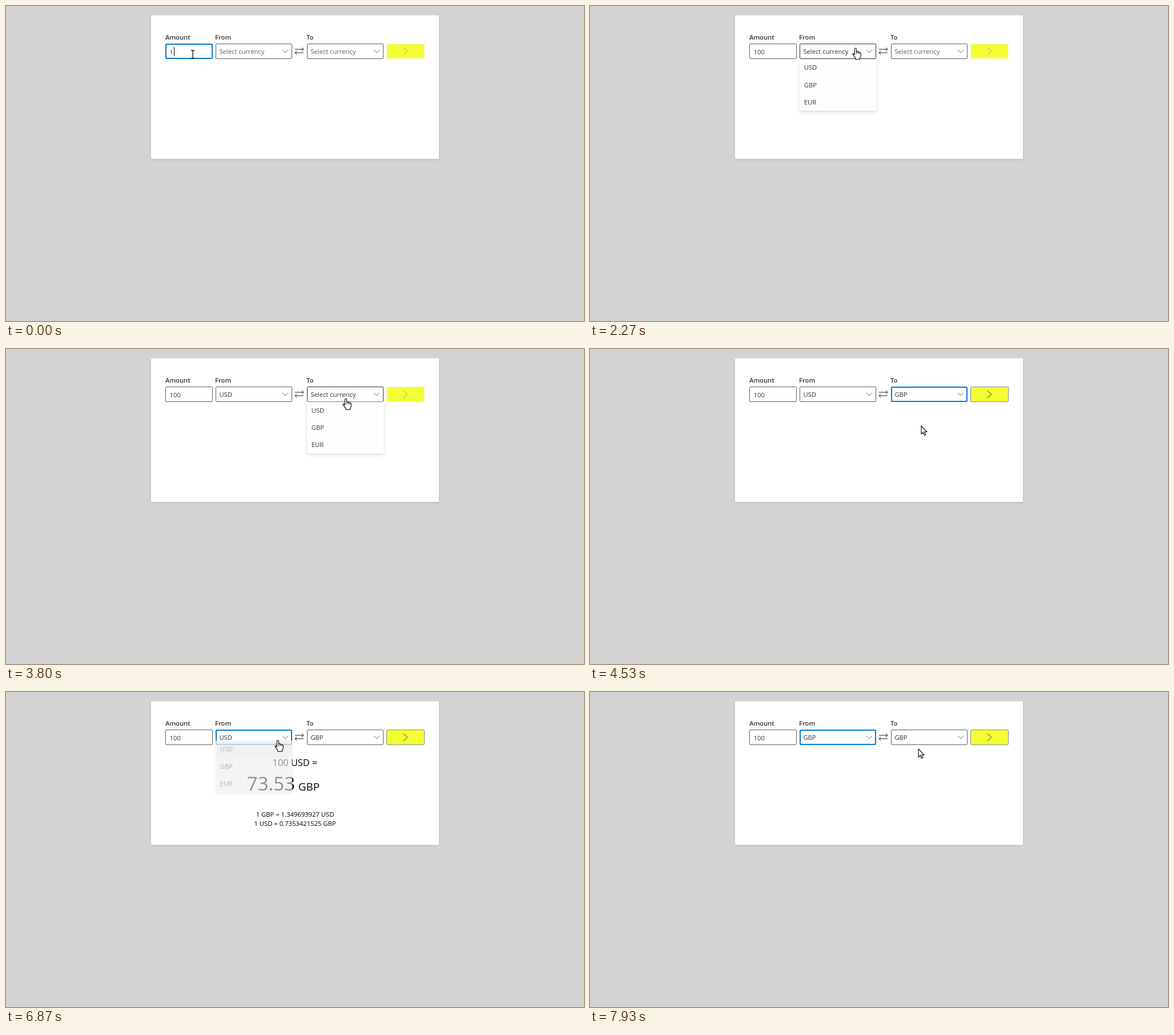
Write an HTML page with a canvas that moves like this. It is 1012 px wide and 553 px high and loops after 8000 ms.

```html
<!DOCTYPE html>
<html lang="en">
<head>
<meta charset="utf-8">
<title>Currency converter</title>
<style>
html, body { margin: 0; width: 100%; height: 100%; overflow: hidden; background: #d3d3d3; }
canvas { display: block; }
</style>
</head>
<body>
<canvas id="stage" width="1012" height="553"></canvas>
<script>
const ctx = document.getElementById('stage').getContext('2d');
const LOOP = 8000, TICK = 1000 / 15;
const DARK = '#323130', GREY = '#605e5c', BLUE = '#0078d4', YELLOW = '#f3ff34';
const CURRENCIES = ['USD', 'GBP', 'EUR'];
const ROW = 30.24, MENU_TOP = 93.4;
const FROM = { id: 'from', x: 367, w: 134 };
const TO = { id: 'to', x: 527, w: 134 };

// Pointer stops: [tick, x, y]
const STOPS = [
  [0, 327, 85], [19, 327, 85], [23, 376, 85], [29, 465, 74], [34, 465, 74],
  [39, 462, 104], [45, 462, 104], [53, 595, 87], [57, 595, 87], [64, 580, 135],
  [68, 580, 135], [73, 709, 90], [75, 709, 90], [80, 688, 87], [92, 688, 87],
  [93, 687, 85], [101, 476, 85], [103, 476, 85], [111, 462, 136], [116, 462, 136],
  [119, 575, 100], [120, 575, 100]
];
// Spans: [first tick, end tick, control]
const FOCUS = [[0, 29, 'amount'], [29, 32, 'from'], [45, 53, 'from'], [53, 56, 'to'],
  [67, 80, 'to'], [101, 104, 'from'], [116, 121, 'from']];
const OPEN = [[31, 45, 'from'], [55, 67, 'to'], [103, 116, 'from']];

const HAND = new Path2D('M-1.6 11.5V1.6Q-1.6 0 0 0Q1.5 0 1.5 1.6V6.5Q2 5.6 3 5.7Q4.2 5.9 4.2 7' +
  'Q4.8 6.3 5.8 6.5Q6.9 6.8 6.9 8Q9.3 7.2 9.3 9.5V13Q9.3 15 7.5 17V19.5H0V17.5' +
  'Q-2.5 14.5 -4.8 11.2Q-5.2 9.5 -4 9.3Q-3 9.2 -1.6 11.5Z');
const KNUCKLES = new Path2D('M1.5 6.5V10M4.2 7V10M6.9 8V10.5');
const ARROW = new Path2D('M0 0V14.2L3.3 11.2L5.5 16.4L7.8 15.4L5.6 10.3H10Z');
const IBEAM = new Path2D('M-3 -7H-1Q0 -7 0 -6Q0 -7 1 -7H3M0 -6.5V6.5M-3 7H-1Q0 7 0 6Q0 7 1 7H3');

const spanAt = (spans, tick) => spans.find(([a, b]) => tick >= a && tick < b);
const inside = (p, x, y, w, h) => p.x >= x && p.x < x + w && p.y >= y && p.y < y + h;

function pointerAt(tick) {
  const i = STOPS.findIndex((s, k) => k > 0 && tick <= s[0]);
  const [t0, x0, y0] = STOPS[i - 1], [t1, x1, y1] = STOPS[i];
  const u = (tick - t0) / (t1 - t0), e = u * u * (3 - 2 * u);
  return { x: Math.round(x0 + (x1 - x0) * e), y: Math.round(y0 + (y1 - y0) * e) };
}

// cubic-bezier(.1, .9, .2, 1)
function decelerate(x) {
  if (x >= 1) return 1;
  const curve = (s, a, b) => 3 * (1 - s) ** 2 * s * a + 3 * (1 - s) * s * s * b + s ** 3;
  let lo = 0, hi = 1;
  for (let i = 0; i < 24; i++) {
    const mid = (lo + hi) / 2;
    if (curve(mid, 0.1, 0.2) < x) lo = mid; else hi = mid;
  }
  return curve(lo, 0.9, 1);
}

function text(str, x, y, size = 11.2, color = DARK, weight = 400, align = 'left') {
  ctx.font = `${weight} ${size}px "Open Sans", "Noto Sans", sans-serif`;
  ctx.textAlign = align;
  ctx.fillStyle = color;
  ctx.fillText(str, x, y);
}

function line(points, color, width = 1) {
  ctx.beginPath();
  points.forEach(([x, y]) => ctx.lineTo(x, y));
  ctx.strokeStyle = color;
  ctx.lineWidth = width;
  ctx.stroke();
}

function box(x, y, w, h, fill, border, width = 1) {
  ctx.beginPath();
  ctx.roundRect(x + width / 2, y + width / 2, w - width, h - width, 1.2);
  ctx.fillStyle = fill;
  ctx.fill();
  ctx.strokeStyle = border;
  ctx.lineWidth = width;
  ctx.stroke();
}

function panel(x, y, w, h, depth) {
  for (const [dy, blur, alpha] of [[1.35, 3, 0.132], [0.25, 0.75, 0.108]]) {
    ctx.save();
    ctx.shadowColor = `rgba(0,0,0,${alpha})`;
    ctx.shadowOffsetY = dy * depth;
    ctx.shadowBlur = blur * depth;
    ctx.fillStyle = '#fff';
    ctx.beginPath();
    ctx.roundRect(x, y, w, h, 1.7);
    ctx.fill();
    ctx.restore();
  }
}

function field(x, w, focused, hovered) {
  box(x, 66, w, 27, '#fff', focused ? BLUE : hovered ? DARK : GREY, focused ? 2 : 1);
}

function select(s, value, state) {
  const active = state.hover === s.id || state.open === s.id;
  field(s.x, s.w, state.focus === s.id, active);
  text(value || 'Select currency', s.x + 6.4, 84, 11.2, value || active ? DARK : GREY);
  const c = s.x + 122;
  line([[c - 5, 77], [c, 82], [c + 5, 77]], GREY, 0.9);
}

function menu(s, value, progress, pointer) {
  ctx.save();
  ctx.globalAlpha = progress;
  ctx.translate(0, -12.5 * (1 - progress));
  panel(s.x, MENU_TOP, s.w + 0.4, 3 * ROW, 2);
  CURRENCIES.forEach((name, i) => {
    const y = MENU_TOP + i * ROW;
    const hovered = inside(pointer, s.x, y, s.w, ROW);
    if (hovered || name === value) {
      ctx.fillStyle = name === value ? '#edebe9' : '#f3f2f1';
      ctx.fillRect(s.x, y, s.w + 0.4, ROW);
    }
    text(name, s.x + 7.8, y + 19.2);
  });
  ctx.restore();
}

function swapIcon() {
  const ink = '#1b1a19';
  line([[506, 76], [521, 76]], ink);
  line([[517.8, 73], [521, 76], [517.8, 79]], ink);
  line([[506, 82], [521, 82]], ink);
  line([[509.2, 79], [506, 82], [509.2, 85]], ink);
}

function goButton(enabled) {
  if (enabled) box(666, 66, 67, 27, YELLOW, '#8a8886');
  else box(666.5, 66.5, 66, 26, YELLOW, '#eceba8', 0.8);
  line([[695.8, 73], [702.8, 79.5], [695.8, 86]], enabled ? DARK : '#a19f6d', 1);
}

function result() {
  const ink = '#000';
  text('100 USD =', 506, 130, 16.4, ink, 400, 'center');
  text('73.53', 421.8, 173, 33, ink);
  text('GBP', 511.8, 173, 18.9, ink);
  text('1 GBP = 1.349693927 USD', 506, 219, 11.25, ink, 400, 'center');
  text('1 USD = 0.7353421525 GBP', 506, 235, 11.25, ink, 400, 'center');
}

function cursor(p, kind) {
  ctx.save();
  ctx.translate(p.x, p.y);
  ctx.lineJoin = 'round';
  ctx.strokeStyle = '#111';
  if (kind === 'text') {
    ctx.lineWidth = 1.3;
    ctx.stroke(IBEAM);
  } else {
    const shape = kind === 'hand' ? HAND : ARROW;
    ctx.lineWidth = 1.2;
    ctx.fillStyle = '#fff';
    ctx.fill(shape);
    ctx.stroke(shape);
    if (kind === 'hand') {
      ctx.lineWidth = 0.9;
      ctx.stroke(KNUCKLES);
    }
  }
  ctx.restore();
}

function hoverAt(p, open) {
  const s = open === 'from' ? FROM : TO;
  if (open && inside(p, s.x, MENU_TOP, s.w, 3 * ROW)) return 'item';
  if (inside(p, 279, 66, 83, 27)) return 'amount';
  for (const c of [FROM, TO]) if (inside(p, c.x, 66, c.w, 27)) return c.id;
  return inside(p, 666, 66, 67, 27) ? 'button' : '';
}

function draw(time) {
  const tick = Math.floor((time % LOOP + 3.4) / TICK);
  const pointer = pointerAt(tick);
  const opened = spanAt(OPEN, tick), focused = spanAt(FOCUS, tick);
  const open = opened && opened[2], focus = focused && focused[2];
  const hover = hoverAt(pointer, open);
  const state = { open, focus, hover };
  const amount = tick < 15 ? '1' : tick < 17 ? '10' : '100';
  const from = tick < 45 ? '' : tick < 116 ? 'USD' : 'GBP';
  const to = tick < 67 ? '' : 'GBP';

  ctx.fillStyle = '#d3d3d3';
  ctx.fillRect(0, 0, 1012, 553);
  panel(254, 16.6, 504, 252, 1);

  text('Amount', 279, 59, 11.2, DARK, 600);
  text('From', 366, 59, 11.2, DARK, 600);
  text('To', 526, 59, 11.2, DARK, 600);

  field(279, 83, focus === 'amount', hover === 'amount');
  text(amount, 286.6, 84.5);
  const caretOn = tick < 7 || (tick >= 15 && tick < 25);
  if (focus === 'amount' && caretOn) {
    ctx.fillStyle = '#000';
    ctx.fillRect(288 + 6 * amount.length, 72, 1, 16);
  }

  select(FROM, from, state);
  swapIcon();
  select(TO, to, state);
  goButton(tick >= 67);
  if (tick >= 82 && tick < 116) result();

  if (open) {
    const elapsed = (tick - opened[0]) * TICK + 17;
    const isFrom = open === 'from';
    menu(isFrom ? FROM : TO, isFrom ? from : to, decelerate(elapsed / 367), pointer);
  }
  cursor(pointer, hover === 'amount' ? 'text' : hover ? 'hand' : 'arrow');
}

const start = performance.now();
function loop() {
  draw(performance.now() - start);
  requestAnimationFrame(loop);
}
loop();
</script>
</body>
</html>
```
